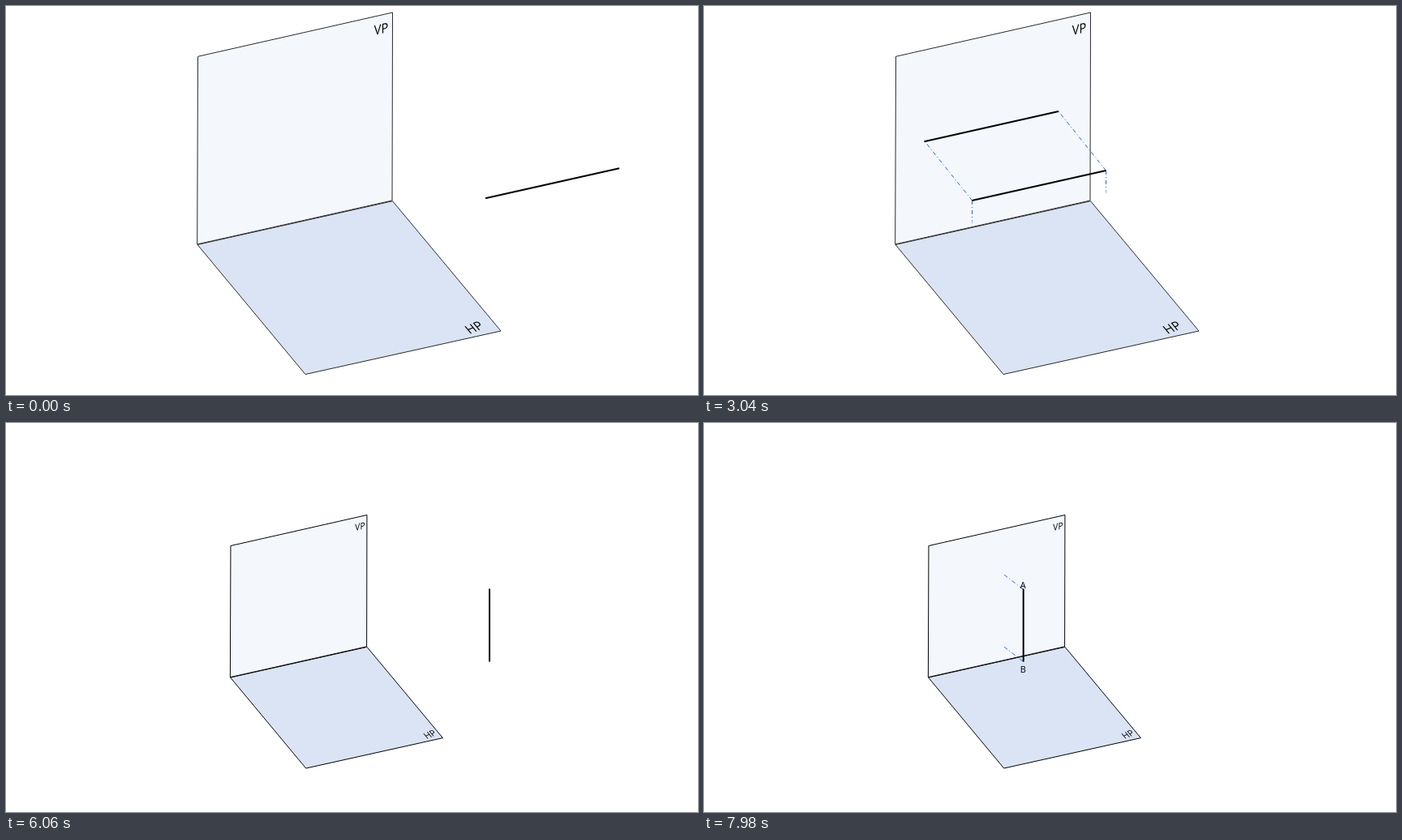
An HTML page for the animation above (8 s loop, 853 by 480 pixels).

```html
<!DOCTYPE html>
<html lang="en">
<head>
<meta charset="utf-8">
<title>Projection of lines</title>
<style>
  html, body { margin: 0; width: 100%; height: 100%; overflow: hidden; background: #fff; }
  svg { display: block; width: 100vw; height: 100vh; }
  text { font-family: "Open Sans", "Noto Sans", sans-serif; text-anchor: middle; fill: #000; }
</style>
</head>
<body>
<svg id="stage" viewBox="0 0 853 480"></svg>
<script>
const LOOP = 8000;
const SOFT = 0.1; // width of a wipe's faded front
const BLUE = '#2f62c8';
const stage = document.getElementById('stage');

function add(parent, tag, attrs, text) {
  const el = document.createElementNS('http://www.w3.org/2000/svg', tag);
  for (const key in attrs) el.setAttribute(key, attrs[key]);
  if (text) el.textContent = text;
  parent.appendChild(el);
  return el;
}

const clamp = v => Math.max(0, Math.min(1, v));
const span = (t, from, to) => clamp((t - from) / (to - from));
const ease = u => u < 0.5 ? 2 * u * u : 1 - 2 * (1 - u) * (1 - u);
const show = (el, on) => el.setAttribute('visibility', on ? 'visible' : 'hidden');

const defs = add(stage, 'defs', {});
const wipes = [];

// Gradient paint that reveals a shape from (x1,y1) to (x2,y2).
function wipePaint(x1, y1, x2, y2, color, from, to) {
  const id = 'wipe' + wipes.length;
  const grad = add(defs, 'linearGradient', { id, x1, y1, x2, y2, gradientUnits: 'userSpaceOnUse' });
  const solid = add(grad, 'stop', { 'stop-color': color });
  const clear = add(grad, 'stop', { 'stop-color': color, 'stop-opacity': 0 });
  wipes.push({ solid, clear, from, to });
  return `url(#${id})`;
}

function dash(parent, x1, y1, x2, y2, from, to) {
  const stroke = wipePaint(x1, y1, x2, y2, BLUE, from, to);
  const el = add(parent, 'path', {
    d: `M${x1} ${y1}L${x2} ${y2}`, stroke, 'stroke-dasharray': '5 3 1 3', fill: 'none'
  });
  wipes[wipes.length - 1].el = el;
}

function arrow(parent, x1, y1, x2, y2, from, to) {
  const paint = wipePaint(x1, y1, x2, y2, '#000', from, to);
  const len = Math.hypot(x2 - x1, y2 - y1);
  const c = (x2 - x1) / len, s = (y2 - y1) / len;
  // The paint lives in stage space, so the points are placed there too.
  const at = (a, b) => `${x1 + a * c - b * s} ${y1 + a * s + b * c}`;
  const head = (tip, back) => `M${at(tip, 0)}L${at(back, 2.8)}L${at(back, -2.8)}Z`;
  const g = add(parent, 'g', {});
  add(g, 'path', { d: `M${at(4, 0)}L${at(len - 4, 0)}`, stroke: paint, 'stroke-width': 1.2 });
  add(g, 'path', { d: head(0, 5.5) + head(len, len - 5.5), fill: paint });
  wipes[wipes.length - 1].el = g;
}

function bar(parent, x1, y1, x2, y2) {
  return add(parent, 'line', { x1, y1, x2, y2, stroke: '#000', 'stroke-width': 2 });
}

function planes(parent, transform, edge, vpX, hpX, hpY) {
  const g = add(parent, 'g', { transform });
  const face = (points, fill) => add(g, 'polygon', {
    points, fill, stroke: edge, 'stroke-width': 1, 'vector-effect': 'non-scaling-stroke'
  });
  face('236,294.5 476.5,240.7 610,401 369,454.5', '#dae4f4');
  face('236.5,62.3 476.5,8 476,240 235.7,294', '#f4f8fd');
  const label = (matrix, text) =>
    add(g, 'text', { transform: `matrix(${matrix})`, y: 6, 'font-size': 16.5 }, text);
  label(`.88,-.19,0,1,${vpX},28`, 'VP');
  label(`.84,-.34,.64,.77,${hpX},${hpY}`, 'HP');
}

// First scene: line parallel to both planes
const first = add(stage, 'g', {});
planes(first, 'translate(0 0)', '#2a2a2a', 462.5, 577, 396.5);
dash(first, 330.5, 240, 272, 167, 1580, 2540);
dash(first, 495.5, 203, 437, 130, 1580, 2540);
dash(first, 330.5, 240, 330.5, 328, 2740, 3700);
dash(first, 495.5, 203, 495.5, 291.5, 2740, 3700);
const frontView = bar(first, 271.5, 167.2, 437, 130);
const topView = bar(first, 330.5, 328.2, 495.5, 291.3);
const slider = bar(first, 0, 37, 165, 0);
arrow(first, 365.5, 265.5, 365.5, 150, 3700, 4520);
arrow(first, 365.5, 265.5, 405, 311, 4540, 5340);

// Second scene: line perpendicular to HP
const second = add(stage, 'g', {});
add(second, 'rect', { width: 853, height: 480, fill: '#fff' });
planes(second, 'translate(111.4 107.9) scale(.7)', '#000', 464.3, 587.3, 394.5);
dash(second, 393, 205, 353, 174, 7400, 8360);
dash(second, 393, 294, 353, 263, 7400, 8360);
const upright = bar(second, 0, 204.5, 0, 294.5);
const names = add(second, 'g', { 'font-size': 11 });
add(names, 'text', { x: 393.3, y: 204 }, 'A');
add(names, 'text', { x: 393.3, y: 308 }, 'B');

function draw(t) {
  const slide = ease(span(t, 0, 1350));
  slider.setAttribute('transform', `translate(${591 - 260.5 * slide} ${200.2 + 2.7 * slide})`);
  show(frontView, t >= 2530);
  show(topView, t >= 3690);

  for (const w of wipes) {
    const front = span(t, w.from, w.to) * (1 + SOFT);
    w.solid.setAttribute('offset', clamp(front - SOFT));
    w.clear.setAttribute('offset', clamp(front));
    w.clear.setAttribute('stop-opacity', clamp((front - 1) / SOFT));
    show(w.el, t > w.from);
  }

  const fade = span(t, 5340, 5770);
  second.setAttribute('opacity', fade);
  second.setAttribute('display', fade > 0 ? 'inline' : 'none');
  const x = 611.2 - 217.5 * ease(span(t, 5766, 7345));
  upright.setAttribute('transform', `translate(${x} 0)`);
  names.setAttribute('display', t >= 7375 ? 'inline' : 'none');
}

const start = performance.now();
function tick() {
  draw((performance.now() - start) % LOOP);
  requestAnimationFrame(tick);
}
draw(0);
requestAnimationFrame(tick);
</script>
</body>
</html>
```
